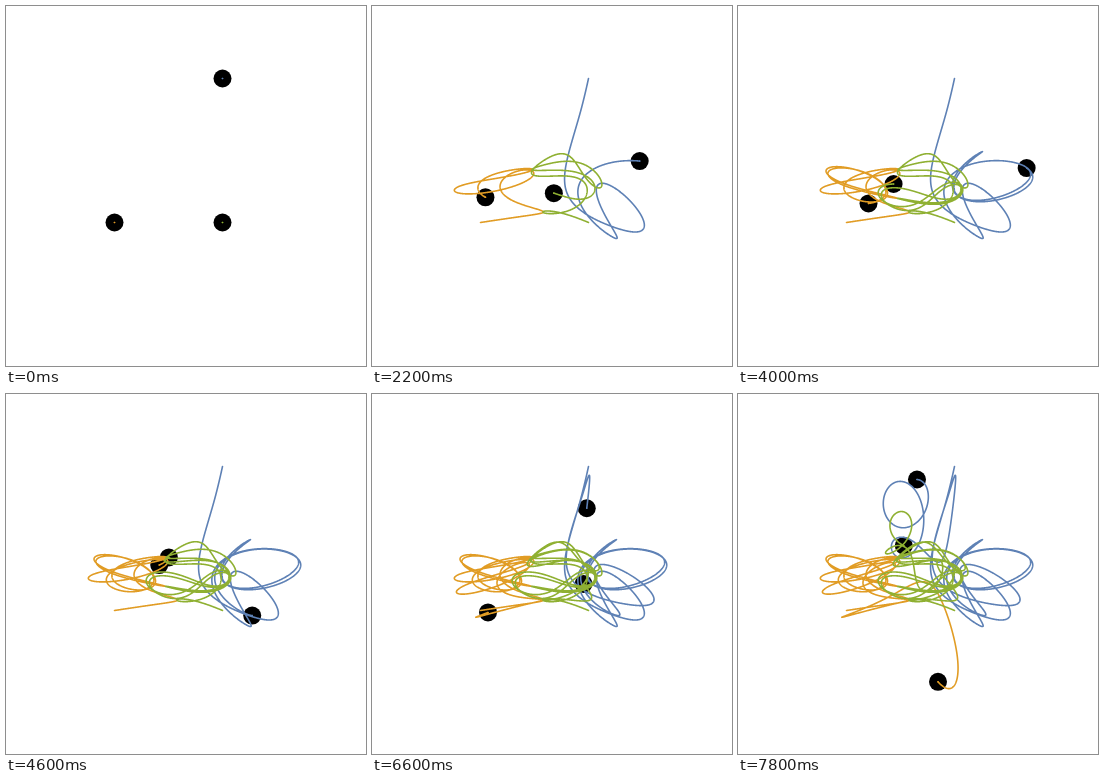
An HTML page with a canvas that plays this animation: 360 px wide and 360 px high, repeating every 8 s.

```html
<!DOCTYPE html>
<html lang="en">
<head>
<meta charset="utf-8">
<title>Three-body problem</title>
<style>
  html, body { margin: 0; width: 100%; height: 100%; overflow: hidden; background: #fff; }
  canvas { display: block; width: 360px; height: 360px; }
</style>
</head>
<body>
<canvas id="stage"></canvas>
<script>
const SIZE = 360, CENTER = 180.5, UNIT = 36, FRAMES = 40, FRAME_MS = 200;
const DISK_RADIUS = 9, LINE_WIDTH = 1.6;
const MASSES = [3, 4, 5];
const COLORS = ["#5e81b5", "#e19c24", "#8fb032"];
const PAIRS = [[0, 1], [0, 2], [1, 2]];

// State: three positions (x, y) followed by three velocities; all bodies start at rest.
let state = [1, 3, -2, -1, 1, -1, 0, 0, 0, 0, 0, 0];

function derivative(s) {
  const d = [s[6], s[7], s[8], s[9], s[10], s[11], 0, 0, 0, 0, 0, 0];
  for (const [a, b] of PAIRS) {
    const dx = s[2 * b] - s[2 * a], dy = s[2 * b + 1] - s[2 * a + 1];
    const r2 = dx * dx + dy * dy, pull = 1 / (r2 * Math.sqrt(r2));
    d[6 + 2 * a] += MASSES[b] * dx * pull;
    d[7 + 2 * a] += MASSES[b] * dy * pull;
    d[6 + 2 * b] -= MASSES[a] * dx * pull;
    d[7 + 2 * b] -= MASSES[a] * dy * pull;
  }
  return d;
}

function advance(s, d, h) {
  const out = new Array(12);
  for (let i = 0; i < 12; i++) out[i] = s[i] + h * d[i];
  return out;
}

function rungeKutta(s, h) {
  const k1 = derivative(s);
  const k2 = derivative(advance(s, k1, h / 2));
  const k3 = derivative(advance(s, k2, h / 2));
  const k4 = derivative(advance(s, k3, h));
  const out = new Array(12);
  for (let i = 0; i < 12; i++) {
    out[i] = s[i] + h / 6 * (k1[i] + 2 * (k2[i] + k3[i]) + k4[i]);
  }
  return out;
}

// Short steps during close encounters keep the chaotic orbit accurate.
function stepSize(s) {
  let nearest = Infinity;
  for (const [a, b] of PAIRS) {
    nearest = Math.min(nearest, Math.hypot(s[2 * a] - s[2 * b], s[2 * a + 1] - s[2 * b + 1]));
  }
  return 0.001 * nearest ** 1.5;
}

const trails = [[], [], []];
const lengths = [];

function record(spacing) {
  trails.forEach((trail, i) => {
    const x = CENTER + UNIT * state[2 * i];
    const y = CENTER - UNIT * state[2 * i + 1];
    const last = trail[trail.length - 1];
    if (!last || Math.hypot(x - last[0], y - last[1]) >= spacing) trail.push([x, y]);
  });
}

function markFrame() {
  record(0);
  lengths.push(trails.map(trail => trail.length));
}

markFrame();
for (let frame = 1; frame < FRAMES; frame++) {
  let left = 1;
  while (left > 0) {
    const h = Math.min(left, stepSize(state));
    state = rungeKutta(state, h);
    left -= h;
    record(0.4);
  }
  markFrame();
}

const canvas = document.getElementById("stage");
const ctx = canvas.getContext("2d");
const ratio = window.devicePixelRatio || 1;
canvas.width = canvas.height = SIZE * ratio;
ctx.scale(ratio, ratio);
ctx.lineWidth = LINE_WIDTH;
ctx.lineJoin = ctx.lineCap = "round";

function dot([x, y], radius, color) {
  ctx.fillStyle = color;
  ctx.beginPath();
  ctx.arc(x, y, radius, 0, 2 * Math.PI);
  ctx.fill();
}

function draw(frame) {
  ctx.fillStyle = "#fff";
  ctx.fillRect(0, 0, SIZE, SIZE);
  const paths = trails.map((trail, i) => trail.slice(0, lengths[frame][i]));
  for (const path of paths) dot(path[path.length - 1], DISK_RADIUS, "#000");
  paths.forEach((path, i) => {
    ctx.strokeStyle = COLORS[i];
    ctx.beginPath();
    for (const [x, y] of path) ctx.lineTo(x, y);
    ctx.stroke();
    dot(path[path.length - 1], LINE_WIDTH / 2, COLORS[i]);
  });
}

const start = performance.now();
let shown = -1;

function tick() {
  const frame = Math.floor((performance.now() - start) / FRAME_MS) % FRAMES;
  if (frame !== shown) draw(shown = frame);
  requestAnimationFrame(tick);
}
tick();
</script>
</body>
</html>
```
